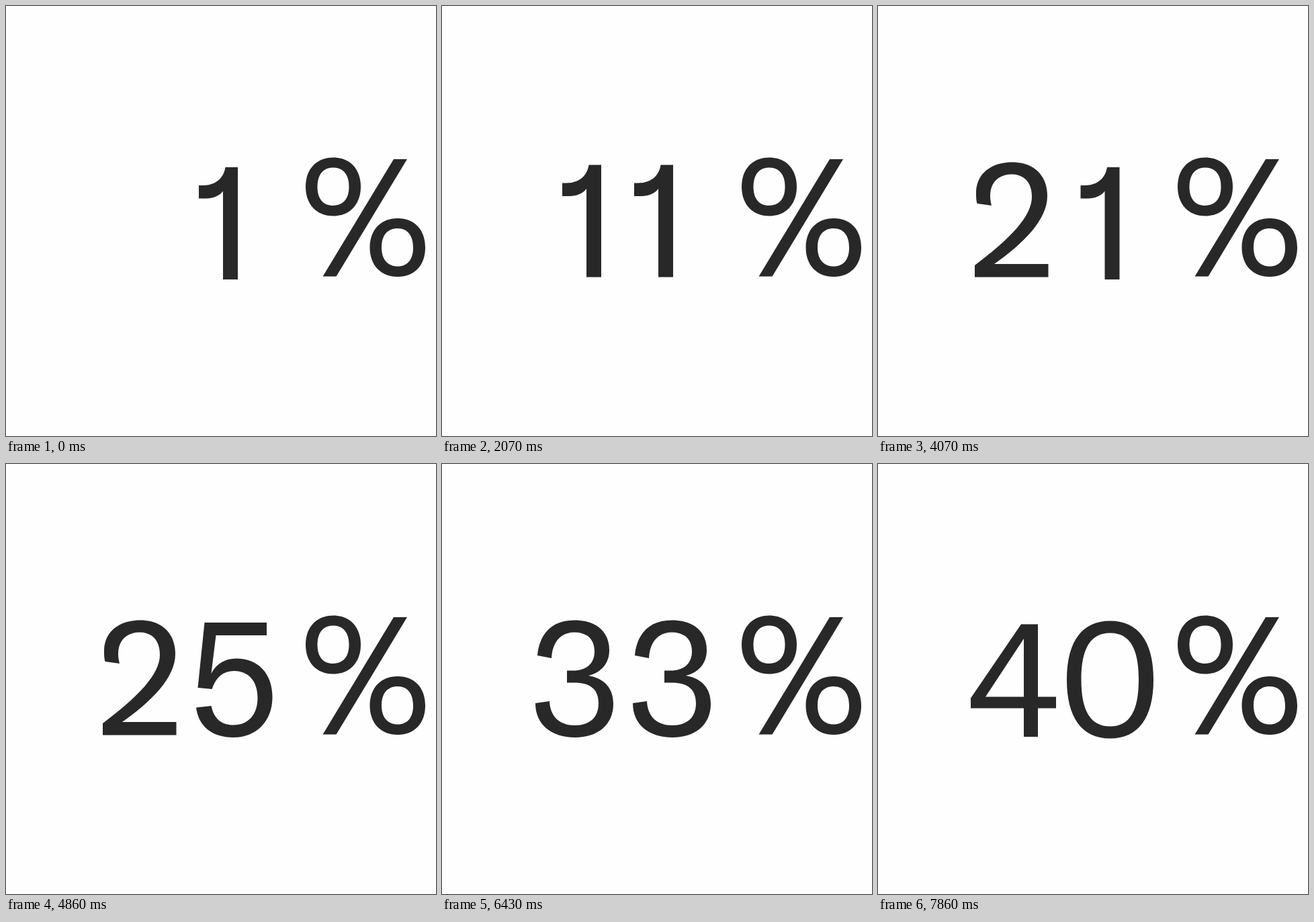
Animation, 640 px wide and 640 px high, one loop 8000 ms. Source, as an HTML page:

```html
<!DOCTYPE html>
<html lang="en">
<head>
<meta charset="utf-8">
<title>Percent counter</title>
<style>
html, body { margin: 0; width: 100%; height: 100%; overflow: hidden; background: #fefefe; }
svg { display: block; width: 100%; height: 100%; fill: #282828; fill-rule: evenodd; }
</style>
</head>
<body>
<svg viewBox="0 0 640 640" role="img" aria-label="1 %">
  <path id="tens"/>
  <path id="ones"/>
  <path d="M446 269C446 243 462 225.5 487 225.5S528 243 528 269S512 312.5 487 312.5S446 295 446 269Z
    M463.5 269C463.5 287 472 297 487 297S510.5 287 510.5 269S502 240.5 487 240.5S463.5 251 463.5 269Z
    M541.5 359.5C541.5 333 558 316 583 316S624 333 624 359.5S608 403 583 403S541.5 386 541.5 359.5Z
    M559 359.5C559 377 568 387.5 583 387.5S606 377 606 359.5S598 331 583 331S559 341 559 359.5Z
    M577 228H597L491.5 402.5H471.5Z"/>
</svg>
<script>
const LOOP = 8000, LAST = 40, FPS = 14;

// Each digit: the x of its centre line, its outline, and an optional extra transform.
const digits = [
  [345.5, `M281 321C281 265 303 233.5 345.5 233.5S410 265 410 321S388 408.5 345.5 408.5S281 377 281 321Z
    M302.5 321C302.5 367 316 390.5 345.5 390.5S388 367 388 321S375 251.5 345.5 251.5S302.5 275 302.5 321Z`],
  [325, 'M345 240V407H323V275.5C317 283 308 286.5 298 286.5H287V267H293C311 267 324 257 326.5 240Z'],
  [199, `M147.5 294C146 289 146 282 146 278C146 251 167 232.5 200 232.5C232 232.5 252 252 252 283
    C252 318 216 354 173 384H253.5V403.5H144V386C197 346 229 313 229 284C229 263 218 250.5 199 250.5
    C179 250.5 167 263 167 283C167 288 168 293 169 297Z`],
  [197, `M142 285C145 252 164 232.5 197 232.5C230 232.5 249 250 249 277C249 296 238 310 218 315
    C242 319 255 334 255 357C255 388 232 407 198 407C163 407 139 388 139 356L160 353
    C161 376 175 389 198 389C220 389 233 377 233 356C233 335 220 325.5 197 325.5H186V307.5H195
    C215 307.5 227 297 227 279C227 261 216 250.5 197 250.5C178 250.5 164 264 163 289Z`],
  [201.5, 'M213 238.5H238V346.5H265V363.5H238V406H217V363.5H138V348.5ZM217 346.5V260L160 346.5Z'],
  [326, `M282 236H374.5V255H299L292 312C299 298 312 289.5 329 289.5C362 289.5 383 312 383 347
    C383 383 359 407 325 407C294 407 273 391 269.5 362.5L292 360C296 379 307 388.5 325 388.5
    C347 388.5 361 373 361 348C361 324 348 308 326 308C310 308 299 317 293 335L272 333Z`],
  null,
  [325, 'M269 236H381V253C346 296 322 349 317 403.5H294C299 347 325 296 358 255H269Z'],
  [325, `M325 232.5C356 232.5 377 250 377 276C377 295 367 308 350 314C371 320 383 335 383 358
    C383 388 360 407 325 407S267 388 267 358C267 335 279 320 300 314C283 308 273 295 273 276
    C273 250 294 232.5 325 232.5Z
    M325 250.5C306 250.5 294 261 294 278S306 306.5 325 306.5S356 295 356 278S344 250.5 325 250.5Z
    M325 323.5C303 323.5 289 336 289 356S303 389 325 389S361 376 361 356S347 323.5 325 323.5Z`],
  [339, `M284 363L305 358C309 378 319 389 338 389C361 389 373 366 375 320C366 334 352 341.5 334 341.5
    C302 341.5 281 320 281 288C281 255 304 232.5 337 232.5C376 232.5 397 261 397 315
    C397 374 377 407 338 407C309 407 289 392 284 363Z
    M303 287C303 309 316 323 338 323C357 323 372 310 375 292C370 266 358 250.5 339 250.5
    C317 250.5 303 264 303 287Z`]
];
digits[6] = [...digits[9], 'rotate(180 339 319.75)'];

// Centre of the last digit depends on the digit before it.
const onesCentre = [325, 335.5, 339.5, 342, 345.5];
const tensCentre = [0, 217, 199, 197, 201.5];
const placed = { 10: [342.5, -6], 11: [324, -3.5] };

const svg = document.querySelector('svg');
const tens = document.getElementById('tens');
const ones = document.getElementById('ones');

function put(node, digit, x, y) {
  const [centre, outline, turn = ''] = digits[digit];
  node.setAttribute('d', outline);
  node.setAttribute('transform', `translate(${x - centre} ${y}) ${turn}`);
}

function show(n) {
  const lead = Math.floor(n / 10);
  const [x, y] = placed[n] || [onesCentre[lead], lead === 1 ? -3 : 0];
  if (lead) put(tens, lead, tensCentre[lead], lead === 1 ? -3.5 : 0);
  else tens.setAttribute('d', '');
  put(ones, n % 10, x, y);
  svg.setAttribute('aria-label', `${n} %`);
}

// Five counts per second, each held back to the next tick.
function startOf(n) {
  const tick = Math.floor(14 * (n - 1) / 5) + 1;
  return Math.round(tick * 100 / FPS) * 10;
}

let shown = 0;
function draw() {
  const t = performance.now() % LOOP;
  let n = 1;
  while (n < LAST && startOf(n + 1) <= t) n++;
  if (n !== shown) show(shown = n);
  requestAnimationFrame(draw);
}
draw();
</script>
</body>
</html>
```
